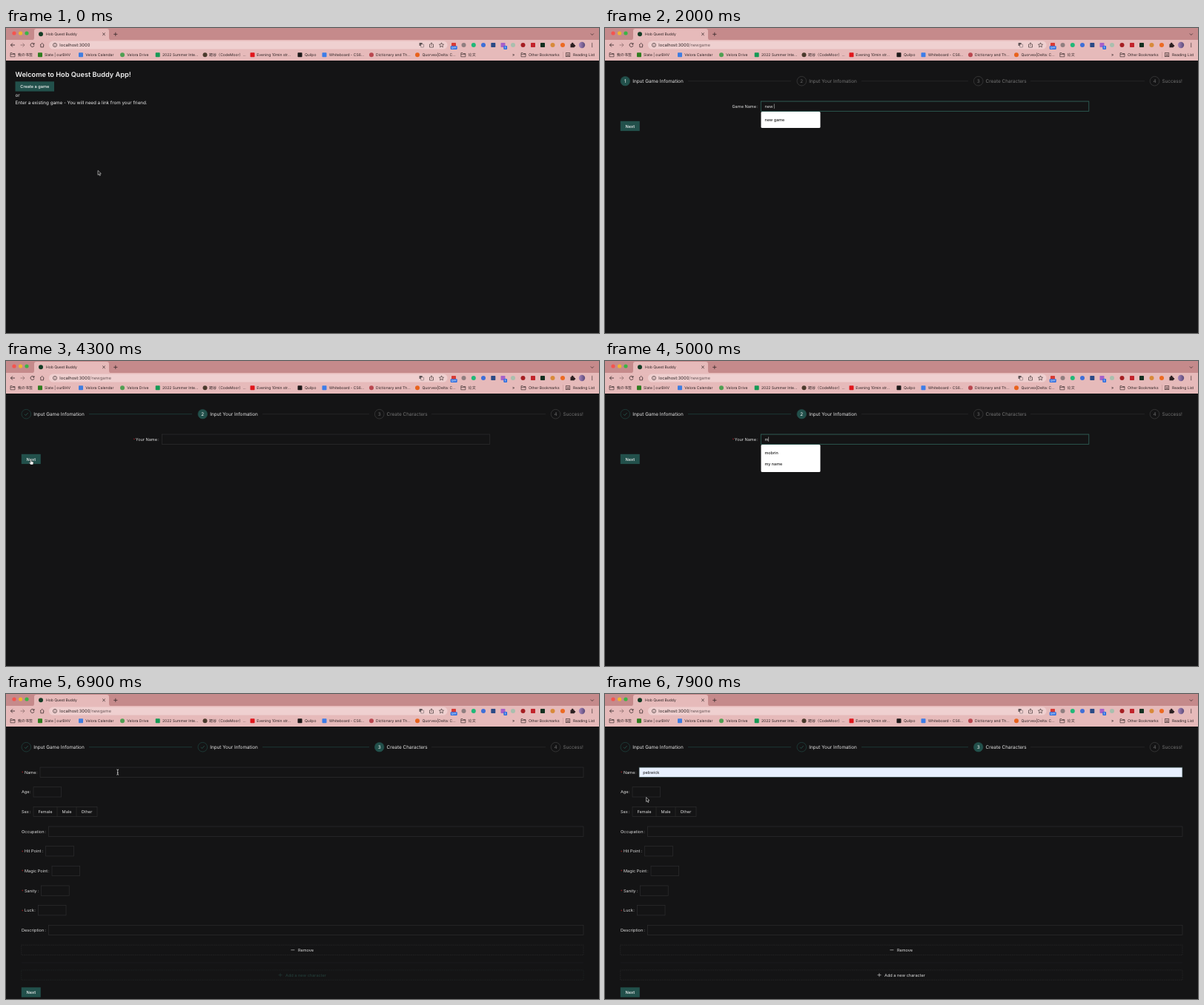
Write an HTML page that moves like this. It is 800 px wide and 412 px high and loops after 8 s.

```html
<!DOCTYPE html>
<html lang="en">
<head>
<meta charset="utf-8">
<title>Game helper walkthrough</title>
<style>
html, body { margin: 0; width: 100%; height: 100%; overflow: hidden; background: #141415; }
svg { display: block; width: 800px; height: 412px; text-rendering: geometricPrecision; }
text { font-family: Inter, "Noto Sans CJK SC", "Noto Sans CJK", sans-serif; white-space: pre; }
</style>
</head>
<body>
<svg viewBox="0 0 800 412"><g id="browser"></g><g id="page"></g><g id="mouse"></g></svg>
<script>
const LOOP = 8000, TICK = 100;
const GREEN = '#22504b', LINE = '#303032', INK = '#dcdcdc', BLACK = '#2b2021';

const text = (x, y, s, size = 5.6, fill = INK, weight = 400, anchor = 'start') =>
  `<text x="${x}" y="${y}" font-size="${size}" fill="${fill}" font-weight="${weight}" text-anchor="${anchor}">${s}</text>`;
const rect = (x, y, w, h, fill, extra = '') =>
  `<rect x="${x}" y="${y}" width="${w}" height="${h}" fill="${fill}" ${extra}/>`;
const circle = (x, y, r, fill, extra = '') => `<circle cx="${x}" cy="${y}" r="${r}" fill="${fill}" ${extra}/>`;
const path = (d, stroke, width = 0.7, fill = 'none', extra = '') =>
  `<path d="${d}" stroke="${stroke}" stroke-width="${width}" fill="${fill}" ${extra}/>`;
const dot = (x, y, color, r = 3) => circle(x, y, r, color);
const tile = (x, y, color, s = 6) => rect(x - s / 2, y - s / 2, s, s, color, 'rx="0.8"');

// Browser frame

const folder = x => path(`M${x - 3} 33.6h2.2l.8 .9h3v4.3h-6zM${x - 3} 35.6h6`, BLACK, 0.6);

function browserFrame() {
  const bookmarks = [
    [46, tile, '#2f7d1f', 52, 'Slate | ourBHV'],
    [101, tile, '#3f7de0', 107.3, 'Velora Calendar'],
    [157, dot, '#4f9f52', 163.3, 'Velora Drive'],
    [204.7, tile, '#159a55', 211, '2022 Summer Inte...'],
    [268.5, dot, '#4a3a2c', 274, '题谷（CodeMoor）...'],
    [332.5, tile, '#e0161c', 338.3, 'Evening 10min str...'],
    [396.5, tile, '#1c1818', 403, 'Quilpo'],
    [429.5, tile, '#3d7de8', 436, 'Whiteboard - CS6...'],
    [493, dot, '#b9474f', 499, 'Dictionary and Th...'],
    [555, dot, '#e8621c', 561.5, 'Quorvex|Delta: C...']
  ];
  const extensions = [
    [604, tile, '#d83a34'], [617.5, dot, '#8f7f80'], [630.8, dot, '#1fb978'], [644, dot, '#3f6fd8'],
    [657.3, tile, '#2b4a86'], [670.5, tile, '#a660c8'], [684, dot, '#a9bfae'], [697.5, dot, '#a51e22'],
    [711, tile, '#c2232b'], [724, tile, '#123020'], [737.5, dot, '#d88a3a'], [751, dot, '#ec6a22']
  ];
  let s = rect(0, 0, 800, 17, '#c58a8b') + rect(0, 16, 800, 28, '#e6baba');
  s += path('M35 16.2q3 0 3-3V4q0-3 3-3h95q3 0 3 3v9.200q0 3 3 3z', 'none', 0, '#e6baba');
  s += dot(11, 7, '#f4554f', 2.6) + dot(19.6, 7, '#f2b52f', 2.6) + dot(28, 7, '#3bb545', 2.6);
  s += dot(47, 8.3, '#143c25', 3) + text(54, 10.2, 'Hob Quest Buddy', 5, BLACK);
  s += path('M130.200 6.500l3.600 3.600m0-3.600l-3.600 3.600M145.200 8.400h5.200m-2.600-2.600v5.200M788.800 7.500l2 2 2-2', BLACK);

  s += path('M12 23H6.500m2.400-2.500L6.400 23l2.500 2.500', BLACK, 0.8);
  s += path('M19.500 23H25m-2.400-2.500L25.100 23l-2.500 2.500', '#8d6d6e', 0.8);
  s += path('M37.700 21.600a2.500 2.500 0 1 0 .3 2.100M38 20.200v1.900h-1.900', BLACK, 0.8);
  s += path('M46 23l2.700-2.600 2.700 2.600M46.800 22.500v3.300h3.800v-3.300', BLACK, 0.7);
  s += rect(58, 17.500, 537.500, 11, '#efd0d0', 'rx="5.500"');
  s += circle(66, 23, 2.600, 'none', `stroke="${BLACK}" stroke-width=".6"`) + path('M66 22.700v1.700M66 21.300v.7', BLACK, 0.6);
  s += rect(557.600, 20, 4, 4, '#5d5355', 'rx=".5"') + rect(559.600, 22, 4, 4, '#efd0d0', 'rx=".5" stroke="#5d5355" stroke-width=".5"');
  s += path('M572.500 22h-1v4h5v-4h-1M574 24v-4m-1.400 1.300l1.400-1.400 1.400 1.400', BLACK, 0.6);
  s += path('M587.500 19.900l.9 2.100 2.200.2-1.700 1.500.5 2.200-1.900-1.200-1.900 1.200.5-2.200-1.700-1.500 2.200-.2z', BLACK, 0.6);
  s += extensions.map(([x, shape, color]) => shape(x, 23, color)).join('');
  s += rect(599.700, 24.300, 9, 4.700, '#2f6fe0', 'rx="1"') + text(604.200, 28.100, 'OFF', 3.600, '#fff', 500, 'middle');
  s += rect(671.300, 24, 4.800, 5, '#2f6fe0', 'rx="1"') + text(673.700, 28.100, '1', 4, '#fff', 500, 'middle');
  s += path('M761.500 21.500h1.600a1.200 1.200 0 1 1 2.200 0h1.500v1.500a1.100 1.100 0 1 1 0 2.100v1.200h-5.300z', 'none', 0, BLACK);
  s += circle(777, 23, 4.200, 'url(#avatar)') +
    '<defs><linearGradient id="avatar"><stop stop-color="#a886bd"/><stop offset="1" stop-color="#5b4a78"/></linearGradient></defs>';
  s += [20.800, 23, 25.200].map(y => dot(790.700, y, BLACK, 0.65)).join('');

  s += bookmarks.map(([x, shape, color, tx, label]) => shape(x, 36.200, color) + text(tx, 38.100, label, 5.050, BLACK)).join('');
  s += folder(9) + text(15.800, 38.100, '我の书签', 5.050, BLACK) + folder(616.800) + text(623.600, 38.100, '论文', 5.050, BLACK);
  s += text(683, 38, '»', 5.500, BLACK) + folder(698) + text(705, 38.100, 'Other Bookmarks', 5.050, BLACK);
  s += path('M751.500 32v8.500', '#c99c9d', 0.6) + rect(755.600, 33.700, 5.200, 5, 'none', `stroke="${BLACK}" stroke-width=".6"`);
  s += path('M756.700 35.200h3m-3 1.200h3m-3 1.200h3', BLACK, 0.5) + text(765, 38.100, 'Reading List', 5.050, BLACK);
  return s;
}

// Page parts

const pen = document.createElement('canvas').getContext('2d');
function textWidth(s, size) {
  pen.font = `100px Inter, sans-serif`;
  return pen.measureText(s).width * size / 100;
}

const button = (x, y, w, label) => rect(x, y, w, 13.300, GREEN) + text(x + w / 2, y + 8.800, label, 5.600, '#f4f4f4', 500, 'middle');
const star = (x, y) => text(x, y, '*', 5, '#a61d24', 400) ;

function field(x, w, mid, { value = '', focus = 0, fill = 'none', ink = INK, caret = true } = {}) {
  const box = [x, mid - 6.650, w, 13.300];
  let s = rect(...box, fill, `stroke="${LINE}" stroke-width=".6"`);
  if (focus > 0) s += rect(...box, 'none', `stroke="#2a5f55" stroke-width=".8" opacity="${focus}"`);
  s += text(x + 5.200, mid + 2, value, 5.600, ink);
  if (focus > 0 && caret) {
    const cx = x + 5.400 + textWidth(value, 5.600);
    s += path(`M${cx} ${mid - 3.200}v6.400`, '#e8e8e8', 0.5);
  }
  return s;
}

function suggestions(x, items) {
  if (!items.length) return '';
  return rect(x, 113, 80, 7 + 15 * items.length, '#fff', 'rx="1.500"') +
    items.map((item, i) => text(x + 5, 126 + 15 * i, item, 5.450, '#1c1c1c', 500)).join('');
}
const matching = (history, typed) => history.filter(h => h.startsWith(typed) && h !== typed);

const STEPS = [
  [27.300, 'Input Game Infomation', 112, 251], [265.300, 'Input Your Infomation', 346, 490],
  [503.700, 'Create Characters', 574, 728], [741.500, 'Success!']
];
function stepBar(current) {
  return STEPS.map(([x, title, from, to], i) => {
    const done = i < current, active = i === current;
    const mark = done
      ? path(`M${x - 2.400} 71.800l1.700 1.700 3.100-3.500`, '#2a625a', 0.7)
      : text(x, 74.100, i + 1, 6.400, active ? '#fff' : '#6c6c6c', 400, 'middle');
    const ring = circle(x, 71.700, 6.300, active ? GREEN : 'none', `stroke="${done || active ? GREEN : '#474747'}" stroke-width=".6"`);
    const line = to ? path(`M${from} 71.700H${to}`, done ? '#22504b' : LINE, 0.6) : '';
    return ring + mark + text(x + 9.900, 74, title, 6.400, done || active ? '#e6e6e6' : '#757575') + line;
  }).join('');
}

function nameStep(step, label, value, focus, items) {
  return stepBar(step) + text(204, 107.700, label, 5.600, INK, 400, 'end') + text(205.100, 107.700, ':') +
    (step ? star(171.800, 108) : '') + field(210.300, 442.500, 105.700, { value, focus }) +
    button(20.800, 125.800, 26, 'Next') + suggestions(210.500, items);
}

function dashed(mid, label, icon, color, border = LINE) {
  const x = 400 - textWidth(label, 5.600) / 2 + 4.500, ix = x - 7;
  return rect(20.800, mid - 6.650, 758.200, 13.300, 'none', `stroke="${border}" stroke-width=".6" stroke-dasharray="1.500 1"`) +
    path(`M${ix - 2.500} ${mid}h5` + (icon === '+' ? `M${ix} ${mid - 2.500}v5` : ''), color, 0.6) +
    text(x, mid + 2, label, 5.600, color);
}

const ROWS = [
  ['Name', 46, 733, 1], ['Age', 37, 37.700], ['Sex', 37, 86], ['Occupation', 57.300, 721.700],
  ['Hit Point', 53.700, 37.700, 1], ['Magic Point', 62, 37.700, 1], ['Sanity', 47.500, 37.700, 1],
  ['Luck', 43.300, 37.700, 1], ['Description', 57.300, 721.700]
];
function characterForm(name, addColor, addBorder) {
  let s = ROWS.map(([label, x, w, required], i) => {
    const mid = 105.700 + 26.650 * i;
    return (required ? star(21, mid + 2.300) : '') + text(required ? 25 : 21, mid + 2, label) +
      text(x - 5, mid + 2, ':') + field(x, w, mid, i ? {} : name);
  }).join('');
  s += path('M69 152.400v13.300M95 152.400v13.300', LINE, 0.6);
  s += [[53, 'Female'], [82, 'Male'], [109, 'Other']].map(([x, l]) => text(x, 161, l, 5.600, INK, 400, 'middle')).join('');
  return s + dashed(345.800, 'Remove', '-', INK) + path('M20.800 363H779', '#222224', 0.5) +
    dashed(379.600, 'Add a new character', '+', addColor, addBorder) + button(20.800, 396.300, 26, 'Next');
}

// Timeline

const ramp = (t, from, to) => Math.min(1, Math.max(0, (t - from) / (to - from)));
const typing = (s, t, start, gap) => s.slice(0, Math.max(0, Math.floor((t - start) / gap) + 1));

const GAME = 'new game for fun', PLAYER = 'mobrin', HERO = 'pebwick';
const GAME_HISTORY = ['new game', '111', '1212', 'name', '1112', 'another game name'];
const PLAYER_HISTORY = [PLAYER, 'my name', 'someone'];
const HERO_HISTORY = [HERO, 'test', '111', 'name', 'wizard'];

function home() {
  return text(12.500, 66, 'Welcome to Hob Quest Buddy App!', 9.200, '#f2f2f2', 600) +
    button(12.500, 72.300, 52.500, 'Create a game') + text(12.500, 92.700, 'or', 6.280, '#ececec') +
    text(12.500, 103, 'Enter a existing game - You will need a link from your friend.', 6.280, '#ececec');
}

function pageAt(t) {
  if (t < 500) return home();
  if (t < 4300) {
    const value = typing(GAME, t, 1610, 127);
    const focus = t < 4100 ? ramp(t, 1050, 1400) : 0;
    return nameStep(0, 'Game Name', value, focus, t >= 1050 ? matching(GAME_HISTORY, value) : []);
  }
  if (t < 6400) {
    const value = typing(PLAYER, t, 5000, 100);
    const focus = t < 6200 ? ramp(t, 4700, 4900) : 0;
    return nameStep(1, 'Your Name', value, focus, t >= 4800 ? matching(PLAYER_HISTORY, value) : []);
  }
  if (t < 6800) {
    const hover = t >= 6600;
    return stepBar(2) + dashed(105.700, 'Add a new character', '+', hover ? '#2a625a' : INK, hover ? GREEN : LINE) +
      button(20.800, 122.500, 26, 'Next');
  }
  const picked = t >= 7600, preview = t >= 7400;
  const name = {
    value: preview ? HERO : '',
    fill: preview ? '#e8f0fe' : 'none',
    ink: '#141414',
    focus: picked ? 1 - ramp(t, 7700, 8000) : ramp(t, 7050, 7300),
    caret: !preview
  };
  const settling = t < 7000;
  return stepBar(2) + characterForm(name, settling ? '#24403c' : INK, settling ? '#252a2a' : LINE) +
    (t >= 7100 && !picked ? suggestions(46, HERO_HISTORY) : '');
}

const MOUSE = [
  [0, 124, 192.500], [400, 38, 79], [600, 38, 79], [1000, 217, 104.300], [3700, 217, 104.300], [4100, 33.500, 133],
  [4500, 33.500, 133], [4700, 217, 104.300], [5600, 217, 104.300], [6000, 33.500, 133], [6450, 33.500, 133],
  [6700, 150.700, 105.500], [7150, 150.700, 105.500], [7400, 70, 125], [7600, 70, 125], [7900, 55.600, 139.500]
];
const SHAPES = {
  arrow: path('M0 0v6l1.400-1.200 1 2.200 1-.5-1-2.100 1.900-.2z', '#e8e8e8', 0.6, '#111'),
  hand: path('M-.7 0q.7-.8 1.300 0v2.600l2.400.6q.8.300.6 1.200l-.6 2.600h-3.400l-2-2.700q.3-.9 1.700.1z', '#111', 0.4, '#f4f4f4'),
  beam: path('M-1.400-3.500q1.400 0 1.400.8 0-.8 1.400-.8M0-2.800v5.800M-1.400 3.700q1.400 0 1.400-.8 0 .8 1.400.8M-.8.800h1.600', '#f0f0f0', 0.7)
};

function cursorKind(x, y, t) {
  if (t < 500) return x > 12 && x < 65 && y > 72 && y < 86 ? 'hand' : 'arrow';
  if (x > 20 && x < 47 && y > 124 && y < 139 && t < 6800) return 'hand';
  if (y < 99 || y > 113) return 'arrow';
  if (t >= 6400 && t < 6800) return 'hand';
  return x > (t < 6400 ? 210 : 46) ? 'beam' : 'arrow';
}

function mouseAt(t) {
  if ((t >= 1600 && t < 3700) || (t >= 4950 && t < 5600)) return '';
  let i = MOUSE.length - 1;
  while (MOUSE[i][0] > t) i--;
  const [t0, x0, y0] = MOUSE[i], [t1, x1, y1] = MOUSE[i + 1] || [LOOP, x0, y0];
  const p = ramp(t, t0, t1), e = p * p * (3 - 2 * p);
  const x = x0 + (x1 - x0) * e, y = y0 + (y1 - y0) * e;
  return `<g transform="translate(${x} ${y})">${SHAPES[cursorKind(x, y, t)]}</g>`;
}

const [browser, page, mouse] = ['browser', 'page', 'mouse'].map(id => document.getElementById(id));
const frame = browserFrame();
let shown = -1;

function render(t) {
  const path = t < 500 ? '' : '<tspan fill="#6f5b5c">/newgame</tspan>';
  browser.innerHTML = frame + text(72.300, 25.100, 'localhost:3000' + path, 5.800, BLACK);
  page.innerHTML = pageAt(t);
  mouse.innerHTML = mouseAt(t);
}

function loop() {
  const t = Math.floor(performance.now() % LOOP / TICK) * TICK;
  if (t !== shown) render(shown = t);
  requestAnimationFrame(loop);
}
loop();
</script>
</body>
</html>
```
